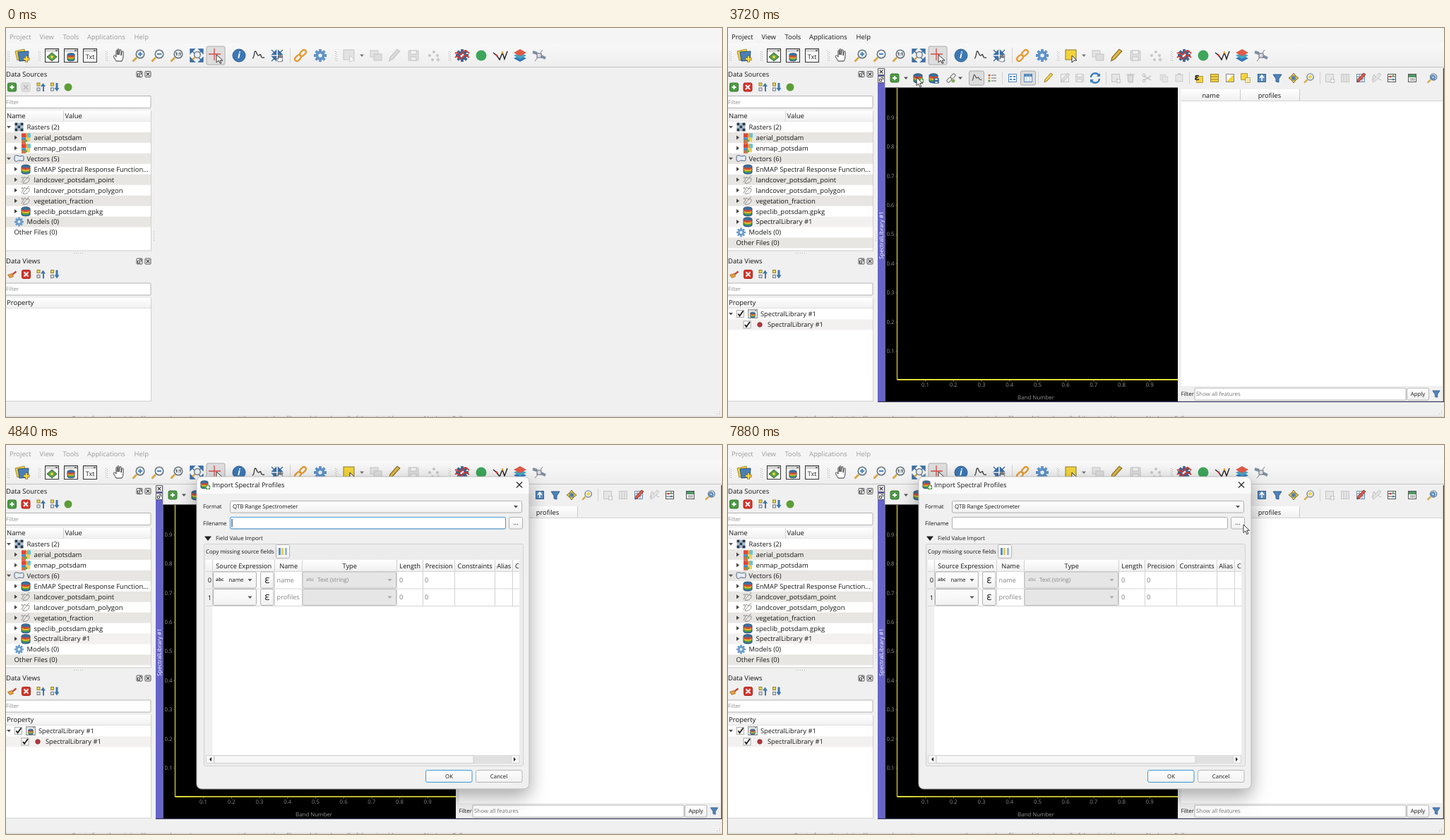
These frames come from a looping animation (1014 px wide and 552 px high, 8 s). An HTML page:

```html
<!DOCTYPE html>
<html lang="en">
<head>
<meta charset="utf-8">
<title>Import spectral profiles</title>
<style>
html,body{margin:0;width:100%;height:100%;overflow:hidden;background:#f0f0f0}
svg{display:block;width:100%;height:100%}
text{font-family:"Open Sans","Noto Sans",sans-serif;white-space:pre;text-rendering:geometricPrecision}
</style>
</head>
<body>
<svg id="stage" viewBox="0 0 1014 552" xmlns="http://www.w3.org/2000/svg"></svg>
<script>
const DARK = '#161616', GREY = '#c6c6c6', BLUE = '#4f86bd', YEL = '#f3d33c';

// Drawing helpers
const R = (x, y, w, h, f = 'none', s = 'none', r = 0) =>
  `<rect x="${x}" y="${y}" width="${w}" height="${h}" fill="${f}" stroke="${s}" rx="${r}"/>`;
const P = (d, f = 'none', s = 'none', w = 1) =>
  `<path d="${d}" fill="${f}" stroke="${s}" stroke-width="${w}"/>`;
const C = (x, y, r, f = 'none', s = 'none', w = 1) =>
  `<circle cx="${x}" cy="${y}" r="${r}" fill="${f}" stroke="${s}" stroke-width="${w}"/>`;
const T = (x, cy, s, size = 9.5, f = DARK, anchor = 'start', more = '') =>
  `<text x="${x}" y="${cy + size * .36}" font-size="${size}" fill="${f}" text-anchor="${anchor}" ${more}>${s}</text>`;
const at = (x, y, body, k = 1) => `<g transform="translate(${x} ${y}) scale(${k})">${body}</g>`;
const turn = body => [0, 90, 180, 270].map(a => `<g transform="rotate(${a})">${body}</g>`).join('');
const G = (id, body, more = '') => `<g id="${id}" ${more}>${body}</g>`;
const down = (x, y, f = '#555', k = 1) => at(x, y, P('M-3-1.5H3L0 2z', f), k);
const side = (x, y) => P(`M${x - 2} ${y - 3}l4 3-4 3z`, '#444');
const dots = (x, y, dx, dy, n) =>
  Array.from({length: n}, (_, i) => R(x + dx * i, y + dy * i, 1, 1, '#b0b0b0')).join('');
const gear = (f, r = 7) => {
  let d = '';
  for (let a = 0; a < 8; a++) d += `M0 0L${r * Math.cos(a * Math.PI / 4)} ${r * Math.sin(a * Math.PI / 4)}`;
  return P(d, 'none', f, r * .42) + C(0, 0, r * .7, f) + C(0, 0, r * .3, '#eef2f6');
};

// Icons, each centred on 0,0
const band = (y, f) => P(`M-6 ${y}V${y + 2.7}A6 2.2 0 0 0 6 ${y + 2.7}V${y}z`, f);
const db = band(2, '#2f6fb3') + band(.3, '#4f9f3a') + band(-1.9, '#e9b32a') + band(-4, '#cf4a35') +
  '<ellipse cx="0" cy="-4" rx="6" ry="2.2" fill="#3a6f9f"/>' + P('M-6-4V4.7A6 2.2 0 0 0 6 4.7V-4A6 2.2 0 0 0-6-4', 'none', '#2a4a68', .9);
const plus = P('M0-3V3M-3 0H3', 'none', '#fff', 2);
const badge = (x, y, f = '#57a046') => at(x, y, R(-4, -4, 8, 8, f, 'none', 2) + plus, .8);
const frame = body => R(-9.5, -9.5, 19, 19, '#fafafa', '#333') + R(-9, -9, 18, 4, '#d6d6d6') +
  P('M5-7H8', 'none', '#555', 1.5) + body;
const lens = body => P('M-3 3L-8.5 8.5', 'none', '#d7a63f', 2.8) + C(2, -2, 5.8, '#e8eef4', '#66717c', 1.5) + at(1, 0, body);
const corners = (f, r = 8) => turn(P(`M${r} ${r}H${r - 6}L${r} ${r - 6}zM3 3L${r - 2} ${r - 2}`, f, f, 1.4));
const inward = f => turn(P('M1.5 1.5H7L1.5 7zM4 4L8 8', f, f, 1.4));
const pencil = (f, s) => P('M-5 6L-4 2 4-7 7-5-1 4z', f, s);
const box = (f, s, body = '') => R(-5.5, -5.5, 11, 11, f, s) + body;
const disk = (f, s) => R(-7, -7, 14, 14, f, s, 1) + R(-4, -7, 8, 5, '#f4f4f4', s) + R(-4, 2, 8, 5, '#eee', s);
const wave = f => P('M-8 4C-5 4-6-6-4-6S-2-1 0 0 3-4 4 0 6 3 9 3', 'none', f, 1.3);
const link = (f, w = 2.4) => `<g transform="rotate(-45)">${
  ['-10', '0'].map(x => `<rect x="${x}" y="-3" width="10" height="6" rx="3" fill="none" stroke="${f}" stroke-width="${w}"/>`).join('')}</g>`;
const grid = f => box('#fff', f, P('M-5-2H5M-5 1H5M-2-5V5M2-5V5', 'none', f));
const lines = f => P('M-1-4H6M-1 0H6M-1 4H6', 'none', f, 1.6) +
  C(-4, -4, 1.6, '#c55') + C(-4, 0, 1.6, '#e0a22f') + C(-4, 4, 1.6, '#5a9b4a');
const hand = P('M-4 8C-6 4-9 1-7 0S-4 3-4 2V-6C-4-8-2-8-2-6V-1-8C-2-10 0-10 0-8V-1L1-7C1-9 3-9 3-7V0L4-5C5-7 7-6 6-4 6 2 6 5 4 8z', '#fff', '#333');
const hands = inward('#3a6ea5') + at(4, 4, hand, .6);
const funnel = P('M-6-5H6L2 1V6L-2 5V1z', '#4e83ba', '#315e8c');
const arrow = P('M0 0V11.5L2.7 9 4.8 13.6 6.8 12.7 4.7 8.2H8.4z', '#fff', '#222', .9);
const tile = [['#d9473c', -6, -6], ['#ef9c3d', 0, -6], ['#f0cf58', 0, 0], ['#3f8fd0', -6, 0], ['#67c3cf', 3, -6],
  ['#dc6d48', -6, 3]].map(a => R(a[1], a[2], a[1] > 2 ? 4 : 6, 6, a[0])).join('') + R(-2, 3, 4, 3, '#58a957');
const checker = [0, 1, 2, 3, 4, 5, 6, 7, 8].map(i =>
  R(-6 + i % 3 * 4, -6 + (i / 3 | 0) * 4, 4, 4, i % 2 ? '#a9bccd' : '#27384b')).join('');
const shape = P('M-6-4C-3-6 0-2 4-4 7-5 7 0 6 3 3 4 0 1-3 4-7 5-7-1-6-4z', '#e6ecf4', '#4a5f7c');
const vect = P('M-6 4L-2-4 1-2 5-6M-4 5C1 6 5 3 5-1S-1-1-4 5z', 'none', '#8b8b8b') + C(-5, -3, 1.3, '#aaa');
const treeIcon = up => R(-5, -6, 4, 4, YEL, '#94813a') + R(-5, 1, 4, 4, '#dfe6ef', '#778') +
  P(up ? 'M3 6V-1H0L3.5-6 7-1H5V6z' : 'M2-6V1H0L3.5 6 7 1H5V-6z', '#3f78ad');
const cross = on => R(-6, -6, 12, 12, on ? '#d5362c' : '#e2e2e2', on ? '#a8251d' : '#cacaca', 2) +
  P('M-3-3L3 3M3-3L-3 3', 'none', on ? '#fff' : '#bdbdbd', 1.8);
const addBtn = R(-6, -6, 12, 12, '#4d9a45', '#397a33', 2) + plus;
const tiny = (x, y, s = 8) => R(x - s / 2, y - s / 2, s, s, '#f4f4f4', '#555', 1);
const closeBtn = (x, y, s = 8) => tiny(x, y, s) + at(x, y, P('M-2.3-2.3L2.3 2.3M2.3-2.3L-2.3 2.3', 'none', '#333', 1.2));
const floatBtn = (x, y, s = 8) => tiny(x, y, s) + R(x - 2.5, y - .5, 3, 3, '#fff', '#444') + P(`M${x - .5} ${y - 2.5}h3v3`, 'none', '#444');

function editTools(on) {
  const line = on ? '#8a7a32' : GREY, soft = on ? YEL : '#e2e2e2';
  return at(486, 39, R(-8, -8, 15, 14, soft, line) + at(1, 0, P('M0 0V10L3 7H7z', '#fff', on ? '#333' : GREY))) +
    at(549, 39, pencil(on ? '#e3bb3e' : '#dcdcdc', on ? '#8a7030' : GREY), 1.25) + at(28, 84, cross(on));
}

function toolbar() {
  let s = R(0, 0, 1014, 22, '#f5f5f5') + R(0, 22, 1014, 33, 'url(#bar)') + R(0, 55, 1014, 1, '#c4c4c4');
  for (const x of [2, 46, 141, 466, 627]) s += dots(x, 33, 0, 3, 5) + dots(x + 2, 34, 0, 3, 5);
  const items = [
    [23, P('M-10-6L3-9 5 4-7 7z', YEL, '#a78a2b') + P('M-6-5L9-6 8 7-4 8z', '#4a7fb5', '#2d5074') +
      at(6, 5, P('M0-4.5V4.5M-4.5 0H4.5', 'none', '#765c1c', 4) + P('M0-4V4M-4 0H4', 'none', '#f7d64a', 2.4))],
    [65, frame(P('M0-4L7 2 0 8-7 2z', '#5ba14b', '#33622b') + C(0, 2, 2, YEL))],
    [92, frame(at(0, 2, db, .85))],
    [119, frame(T(0, 2, 'Txt', 9, '#222', 'middle'))],
    [160, hand], [188, lens(P('M1-5V1M-2-2H4', 'none', BLUE, 2))], [215, lens(P('M-2-2H4', 'none', BLUE, 2))],
    [242, lens(T(1, -2, '1:1', 6, '#222', 'middle', 'font-weight="bold"'))],
    [270, corners('#3a6ea5', 9) + P('M-2 2L-6 6', 'none', '#d7a63f', 2.4) + C(1, -1, 4.3, '#e8eef4', '#66717c', 1.3)],
    [297, R(-13, -13, 26, 26, '#dedede', '#adadad', 2) + P('M-2-10V7M-10-2H7', 'none', '#d64b45', 1.3) + at(1, -1, P('M0 0V11L3 8 5 12H7L5 8H9z', '#fff', '#333'))],
    [330, C(0, 0, 9, '#3c78b4', '#2b5c8e') + T(0, -.4, 'i', 13, '#fff', 'middle', 'font-weight="bold" font-style="italic"')],
    [357, wave('#333')], [384, hands], [417, link('#e49a31')], [445, gear('#5e93c8', 9)],
    [524, R(-8, -7, 11, 9, '#e4e4e4', GREY) + R(-3, -2, 11, 9, '#ddd', GREY)], [577, disk('#dedede', GREY)],
    [606, C(-6, 0, 2, GREY) + C(0, -5, 2, GREY) + C(5, 0, 2, GREY) + C(-2, 6, 2, GREY) + at(6, 6, P('M0-3V3M-3 0H3', 'none', GREY, 1.5))],
    [646, gear('#41648f', 9) + P('M-10-3C-6-7-4 3 0-3S5-8 10-3M-10 3C-6-2-4 8 0 3S5-1 10 3', 'none', '#d8382f', 1.9)], [673, C(0, 0, 7.5, '#3da65a')],
    [700, P('M-10-4L-5 0-1 6 3-4 6 5 10-6', 'none', '#222', 1.4) + C(-5, 0, 1.4, '#d33') + C(3, -4, 1.4, '#e8a22c')],
    [728, P('M0 0L9 4 0 9-9 4z', '#3377b8') + P('M0-4L9 0 0 5-9 0z', '#44a6c6') + P('M0-9L9-4 0 1-9-4z', '#e05a46')],
    [755, P('M-9-5L-3-3M3 1L9 4', 'none', '#7e8fa2', 4) + R(-3, -3, 6, 6, '#d9dde2', '#667') + P('M-2 3L-6 8M2-4L5-8', 'none', '#778')]
  ];
  for (const [x, body] of items) s += at(x, 39, body);
  return s + down(504, 39, '#777') + R(402, 28, 1, 22, '#d3d3d3');
}

function panel(title, y, icons, headH) {
  return T(0, y, title) + floatBtn(189, y) + closeBtn(201, y) + icons.map(i => at(i[0], y + 18.5, i[1])).join('') +
    R(-1, y + 31, 206, 17, '#fff', '#b2b2b2', 1) + T(0, y + 39.5, 'Filter', 7.8, '#8c8c8c') +
    R(0, y + 52, 205, 15, 'url(#head)') + R(0, y + 66.5, 205, 1, '#cfcfcf') + R(0, y + 67, 205, headH, '#fff') +
    R(205, y + 52, 1, headH + 15, '#d0d0d0') + R(0, y + 67 + headH, 206, 1, '#d0d0d0');
}

function sources(extra) {
  const rows = [
    [0, checker, 'Rasters (2)'], [1, tile, 'aerial_potsdam'], [1, tile, 'enmap_potsdam'],
    [0, shape, `Vectors (${extra ? 6 : 5})`], [1, db, 'EnMAP Spectral Response Function...'],
    [1, vect, 'landcover_potsdam_point'], [1, vect, 'landcover_potsdam_polygon'],
    [1, vect, 'vegetation_fraction'], [1, db, 'speclib_potsdam.gpkg']];
  if (extra) rows.push([1, db, 'SpectralLibrary #1', '#f2f1ef']);
  rows.push([2, gear('#6a9ccb', 6.5), 'Models (0)'], [3, '', 'Other Files (0)']);
  return rows.map(([kind, icon, label, fill = '#e8e6e2'], i) => {
    const y = 140.5 + i * 14.95;
    return (i % 2 ? R(0, y - 7.5, 205, 15, fill) : '') +
      (kind == 0 ? down(4, y) : kind == 1 ? side(14, y) : '') +
      at(kind == 1 ? 28 : 18.5, y, icon) + T([29.5, 39.5, 29.5, 11.5][kind], y, label, 9.45);
  }).join('');
}

const tick = P('M-3 0L-1 3 4-4', 'none', '#111', 1.7);
const check = (x, y) => R(x - 5, y - 5, 10, 10, '#fff', '#aaa');

function dock(wide) {
  const x0 = wide ? 254 : 222.5, dx = wide ? 0 : -31, end = wide ? 652.5 : 637,
    ax = wide ? 283.5 : 239.5, step = wide ? 36.8 : 39.72, left = wide ? 657 : 641.5;
  let s = R(212, 57, x0 - 212, 474, '#6664c9') + R(x0, 56, 1014 - x0, 474, '#f0f0f0') +
    R(x0, 84.5, end - x0, 446, '#000') + R(left, 84, 1012 - left, 446, '#f0f0f0') +
    P('M1013.4 57V530.4H212', 'none', '#3b3b5e', 1.2);
  s += wide ? tiny(223, 68, 20) + closeBtn(223, 68) + tiny(223, 90, 20) + floatBtn(223, 90) :
    closeBtn(217, 62, 9) + floatBtn(217, 73, 9);
  s += `<g transform="translate(217.5 294) rotate(-90)">${T(0, 0, 'SpectralLibrary #1', 8, '#fff', 'middle')}</g>`;
  s += P(`M${ax} 85V499`, 'none', '#c4c24c', 1.4) + P(`M${ax} 499H${end}`, 'none', '#dedc36', 1.8);
  for (let i = 1; i < 10; i++) {
    const v = '0.' + i, y = 499.5 - i * 41.4, x = ax + i * step;
    s += T(ax - 4, y, v, 7.8, '#969696', 'end') + T(x + .3, 506.5, v, 7.8, '#969696', 'middle') +
      R(ax - 2, y, 2, 1, '#777') + R(x, 500, 1, 2, '#777');
  }
  s += T(wide ? 466 : 436, 524.5, 'Band Number', 7.9, '#969696', 'middle');
  // Attribute table
  const mid = wide ? 740 : 725, stop = mid + 84;
  s += R(left + .5, 103, 1011 - left, 405, '#fff') + R(left, 87, stop - left, 16, 'url(#head)') + R(left, 103, 1012 - left, 1, '#d4d4d4') +
    R(mid, 87, 1, 16, '#ccc') + R(stop, 87, 1, 16, '#ccc') + T((left + mid) / 2 + .5, 96, 'name', 9.3, DARK, 'middle') +
    T((mid + stop) / 2, 96, 'profiles', 9.3, DARK, 'middle') + T(left, 519.5, 'Filter', 7.9) +
    R(left + 19.5, 511, 940.5 - left, 17, '#fff', '#b5b5b5', 1) + T(left + 21.5, 519.5, 'Show all features', 7.9, '#777') +
    R(961.5, 511, 31, 17, 'url(#btn)', '#b5b5b5', 2) + T(977, 519.5, 'Apply', 7.9, DARK, 'middle') + at(1003, 519, funnel, .85);
  // Library toolbar
  const on = '#dcdcdc', sel = box(YEL, '#9b8536'), off = box('#e6e6e6', GREY);
  const items = [
    [267, addBtn], [300, db + badge(5, 4)], [322, db + at(4, 4, disk('#3e72a5', '#2b5074'), .5)], [347, at(0, 0, link('#777', 1.4), .75) + C(3, 4, 2.5, '#8a6')],
    [383, R(-10.5, -10, 21, 20, on, '#aaa', 2) + at(0, 0, wave('#444'), .8)], [405, lines('#999')],
    [434, box('#fff', BLUE, P('M-4-2H-1M1-2H4M-4 2H-1M1 2H4', 'none', BLUE, 2))],
    [456, R(-10.5, -10, 21, 20, on, '#aaa', 2) + box('#fff', BLUE, R(-5, -5, 10, 3, BLUE) + P('M-2-5V5M2-5V5', 'none', '#9dbbd8'))],
    [484, pencil('#f0cf44', '#94813a')], [508, box('#eee', GREY) + pencil('#ddd', GREY)], [529, at(0, 0, disk('#dedede', GREY), .8)],
    [551, P('M-6-1A6 6 0 0 1 5-4M6 1A6 6 0 0 1-5 4', 'none', '#3e7fc0', 2.4) + P('M2-2H7V-7zM-2 2H-7V7z', '#3e7fc0')],
    [580, off + badge(4, 4, GREY)], [601, P('M-4-4H4L3 6H-3zM-6-5H6M-1-6H1', '#ddd', '#bbb')],
    [625, P('M-5-3L5 3M-5 3L5-3', 'none', '#bbb', 1.2) + C(-5, 4, 2, 'none', '#bbb') + C(-5, -4, 2, 'none', '#bbb')],
    [648, at(-1, -1, off, .7) + at(2, 2, off, .7)], [670, at(0, 0, off, .9) + R(-2, -7, 4, 3, '#ccc')],
    [697, at(2, 2, sel, .8) + T(-2, -2, 'ε', 13, '#222', 'middle', 'font-weight="bold"')], [720, sel + P('M-5-2H5M-5 2H5', 'none', '#9b8536')],
    [742, box('#fff', '#888') + P('M-5 5L5-5V5z', YEL)], [764, at(-2, -2, sel, .8) + at(3, 3, box('#f5e9a9', '#9b8536'), .6)],
    [787, box('#5b8dbf', '#345f8b') + P('M0 4V-3M-3 0L0-4 3 0', 'none', '#fff', 1.6)], [809, funnel],
    [832, turn(P('M0-7L3-3H-3z', YEL, '#777037')) + C(0, 0, 2.5, '#4c79a8')],
    [854, at(0, 0, lens(C(1, -2, 3, YEL)), .8)], [883, off + badge(4, 4, GREY)], [905, off + P('M-2-5V5M2-5V5', 'none', GREY)],
    [927, grid('#6b8cae') + pencil('#d66049', '#933')], [949, at(0, 0, wave('#bbb'), .8) + pencil('#e4e4e4', GREY)],
    [971, box('#fff', '#555', P('M-5-2H5M-5 2H5', 'none', '#555') + C(-2, -2, 1.6, '#c44') + C(2, 2, 1.6, '#48a') + C(2, -3, 1.4, '#5a5'))]
  ];
  if (!wide) items.push([1000, box('#fff', '#555', R(-5, -5, 10, 4, '#4b9a63') + P('M-3 1H4M-3 3H4', 'none', '#777'))],
    [1028.5, at(0, 0, lens(''), .8) + at(1, -1, gear(BLUE, 4))]);
  for (const [x, body] of items) s += at(x + dx, 71, body);
  for (const x of [419, 470, 566, 684, 869]) s += R(x + dx, 62, 1, 18, '#d2d2d2');
  return s + down(283 + dx, 71) + down(360 + dx, 71) + (wide ? T(1008, 70, '»', 13, '#333', 'middle') : '');
}

const FORMAT = 'QTB Range Spectrometer';

function dialog() {
  let s = `<g filter="url(#shade)">${R(270, 45, 471, 443, '#f0f0f0', '#b3b3b3', 7)}</g>` +
    P('M270.5 69V52Q270.5 45.5 277 45.5H734Q740.5 45.5 740.5 52V69z', '#fafafa') +
    at(281, 56, db, .85) + badge(286, 60) + T(292, 57, 'Import Spectral Profiles', 9.4) +
    P('M723 52.5L731 60.5M731 52.5L723 60.5', 'none', '#222', 1.1) +
    T(279, 87.5, 'Format', 7.9) + R(317.5, 79.5, 413, 16.5, 'url(#btn)', '#b0b0b0', 2) + T(321, 87.5, FORMAT, 7.9) + down(722, 87.5) +
    T(279, 111, 'Filename', 7.9) + R(317.5, 102.5, 390, 16.5, '#fff', '#b0b0b0', 2) +
    R(712.5, 102.5, 19, 16.5, 'url(#btn)', '#b0b0b0', 2) + T(722, 110, '...', 9, DARK, 'middle') +
    P('M281 129.5H291L286 136z', '#222') + T(297, 132, 'Field Value Import', 7.9) +
    R(280.5, 140.5, 452, 315, '#ececec', '#d2d2d2', 2) + T(283, 151.5, 'Copy missing source fields', 7.9) +
    R(382.5, 141.5, 19, 19, 'url(#btn)', '#b5b5b5', 2) +
    at(392, 151, R(-6, -5, 3, 10, '#5b8dbf') + R(-2, -5, 3, 10, '#e3cf59') + R(3, -5, 3, 10, '#9ab6cf')) +
    R(283, 163, 444, 289, '#fff') + R(283, 163, 444, 16, 'url(#head)') + R(283, 179, 9, 49, '#f0f0f0') + R(283, 228, 9, 212, '#f0f0f0');
  const cols = [292, 380, 419, 553, 590, 635, 692, 717];
  const names = ['Source Expression', 'Name', 'Type', 'Length', 'Precision', 'Constraints', 'Alias'];
  cols.forEach((x, i) => {
    s += R(x, 163, 1, 65, '#d2d2d2');
    if (names[i]) s += T((x + cols[i + 1]) / 2 + .7, 172, names[i], 9.25, DARK, 'middle');
  });
  s += T(721, 172, 'C', 9.25, DARK, 'start', 'clip-path="url(#edge)"');
  [192, 216.5].forEach((y, i) => {
    s += R(283, y - 13, 444, 1, '#d6d6d6') + T(288.5, y, i, 9.25, DARK, 'middle') +
      R(293.5, y - 12, 61, 23, 'url(#btn)', '#b0b0b0', 2) + down(345.5, y - .5) +
      R(360.5, y - 12, 18.5, 23, 'url(#btn)', '#b0b0b0', 2) + T(369.7, y - 1.5, 'ε', 15, '#222', 'middle') +
      T(383.5, y - .5, i ? 'profiles' : 'name', 9.2, '#858585') +
      R(420, y - 12, 132.5, 23, '#e6e6e6', '#bdbdbd', 2) + down(543.5, y - .5, '#aaa') +
      T(557, y - .5, 0, 9.2, '#777') + T(593, y - .5, 0, 9.2, '#777');
    if (!i) s += T(297, y - 1.5, 'abc', 6.5, '#444', 'start', 'font-weight="bold"') + T(315.5, y - .5, 'name', 7.9) +
      T(425, y - 1.5, 'abc', 6.5, '#aaa', 'start', 'font-weight="bold"') + T(441, y - .5, 'Text (string)', 8.2, '#858585');
  });
  s += R(283, 228, 444, 1, '#d6d6d6') + R(283, 440, 444, 12, '#e0e0e0') + R(283.5, 440.5, 11, 11, '#f7f7f7', '#d5d5d5') +
    R(715.5, 440.5, 11, 11, '#f7f7f7', '#d5d5d5') + R(295, 440.5, 367, 11, '#f7f7f7', '#cecece') +
    P('M291 443v6l-3-3zM719 443v6l3-3z', '#222');
  return s + R(594.5, 461.5, 65.5, 17, 'url(#btn)', '#3d97d8', 2) + T(627.5, 470, 'OK', 7.9, DARK, 'middle') +
    R(665.5, 461.5, 65.5, 17, 'url(#btn)', '#b5b5b5', 2) + T(698, 470, 'Cancel', 7.9, DARK, 'middle') +
    G('focus', R(317.5, 102.5, 390, 16.5, 'none', '#4a9edb', 2)) + G('caret', R(319.5, 105, 1, 11.5, '#111'));
}

function popup() {
  const names = ['Geopackage', 'GeoJSON', 'Envi Spectral Library', FORMAT, 'Orvaline Wavescopes', 'Raster Layer'];
  return R(321, 33, 413, 100, 'rgba(0,0,0,.13)', 'none', 2) + R(317.5, 29, 413.5, 101, '#f0f0f0', '#8c8c8c') +
    R(318, 79.7, 412.5, 16.3, '#0078d7') +
    names.map((n, i) => T(323.5, 38.5 + i * 16.55, n, 7.9, i == 3 ? '#fff' : DARK)).join('');
}

const grad = (id, a, b) => `<linearGradient id="${id}" x2="0" y2="1"><stop stop-color="${a}"/><stop offset="1" stop-color="${b}"/></linearGradient>`;
const menu = [['Project', 5], ['View', 47.5], ['Tools', 80.5], ['Applications', 115], ['Help', 181.5]];
const trees = [[49, treeIcon(true)], [68.5, treeIcon(false)]];
const brush = P('M-6 1L0-1 2 3-3 5z', '#e8a33a', '#a8752b') + P('M1 0L6-4', 'none', '#c8473b', 2.5);

document.getElementById('stage').innerHTML = `<defs>${grad('bar', '#f8f8f8', '#eeeeee')}${grad('head', '#ffffff', '#f0f0f0')}${grad('btn', '#fefefe', '#f1f1f1')}
<filter id="shade" x="-12%" y="-12%" width="124%" height="128%"><feDropShadow dx="0" dy="10" stdDeviation="13" flood-opacity=".35"/></filter>
<clipPath id="edge"><path d="M717 160H727V180H717z"/></clipPath></defs>` +
  R(0, 0, 1014, 552, '#f0f0f0') + toolbar() +
  G('menu', menu.map(m => T(m[1], 12.5, m[0], 9.45, 'currentColor')).join('')) +
  G('toolsOff', editTools(false)) +
  panel('Data Sources', 65.5, [[8.5, addBtn], ...trees, [88, C(0, 0, 5.5, '#5c9d35')]], 183) + T(1, 125, 'Name') + T(83.5, 125, 'Value') + R(81, 118, 1, 14, '#d0d0d0') +
  panel('Data Views', 331, [[8.5, brush], [28.5, cross(true)], ...trees], 131) + T(1, 390, 'Property') +
  dots(96, 319, 3, 0, 5) + dots(209, 289, 0, 3, 5) + R(0, 550.5, 1014, 1.5, '#dcdcdc') +
  T(93, 554, 'Create from the existing library and open its source support the spectral profiles, and then show all of them in table', 8.6, '#777') +
  T(592, 554, 'No. Layer Folk', 8.6, '#777') + dots(1010, 544, 0, 3, 2) + dots(1007, 547, 0, 3, 1) +
  G('treeA', sources(false)) +
  G('treeB', sources(true) + editTools(true) + down(4, 405.5) + check(17.5, 405.5) + at(35, 405.5, frame(at(0, 2, db, .9)), .65) +
    T(46, 405.8, 'SpectralLibrary #1', 9.3) + R(0, 413.5, 205, 15, '#f2f1ef') + check(27, 421) + at(27, 421, tick) +
    C(45, 421, 3.2, '#b5383c', '#8b3034') + T(56, 421, 'SpectralLibrary #1', 9.3)) +
  G('checked', at(17.5, 405.5, tick)) + G('wide', dock(true)) + G('narrow', dock(false)) +
  G('hover', R(79.5, 26.5, 25, 25, 'none', '#8c8c8c', 2)) +
  G('pressed', R(258.5, 61.5, 20, 19, 'none', '#aaa', 2)) +
  G('dialog', dialog()) + G('popup', popup()) +
  G('click', C(0, 0, 10.3, '#8cc83c'), 'opacity=".82"') + G('cursor', arrow);

const el = {};
for (const id of ['menu', 'toolsOff', 'treeA', 'treeB', 'checked', 'wide', 'narrow', 'hover', 'pressed', 'dialog', 'focus', 'caret', 'popup', 'click', 'cursor'])
  el[id] = document.getElementById(id);
const show = (id, on) => el[id].style.display = on ? '' : 'none';

// Pointer path: time, x, y
const path = [[320, 878, 515], [520, 375, 132], [720, 375, 132], [1520, 98, 42], [1760, 93, 38], [2960, 93, 38],
  [3520, 293, 72], [3760, 265, 70], [3840, 264, 69], [4000, 264, 70], [4600, 264, 70], [4880, 340, 73],
  [5320, 696, 85], [5760, 427, 89], [7240, 427, 89], [7880, 730, 113]];

function pointer(t) {
  let i = 0;
  while (i < path.length - 2 && t >= path[i + 1][0]) i++;
  const [a, b] = [path[i], path[i + 1]];
  const u = Math.max(0, Math.min(1, (t - a[0]) / (b[0] - a[0]))), e = u * u * (3 - 2 * u);
  return [a[1] + (b[1] - a[1]) * e, a[2] + (b[2] - a[2]) * e];
}

function draw(t) {
  const within = (a, b) => t >= a && t < b, lib = t >= 2360;
  el.menu.setAttribute('color', within(2160, 4600) ? DARK : '#9b9b9b');
  show('toolsOff', !lib);
  show('treeA', !lib);
  show('treeB', lib);
  show('checked', t >= 2960);
  show('wide', within(2440, 2640));
  show('narrow', t >= 2640);
  show('hover', within(1480, 3040));
  show('pressed', within(4240, 4520));
  show('dialog', t >= 4520);
  const u = Math.max(0, Math.min(1, (t - 4520) / 240)), k = 1 - .2 * (1 - u) ** 3;
  el.dialog.setAttribute('opacity', Math.min(1, .1 + u * .95));
  el.dialog.setAttribute('transform', `translate(${453 * (1 - k)} ${240 * (1 - k)}) scale(${k})`);
  show('focus', t < 6040);
  show('caret', t < 5080 || within(5600, 6040));
  show('popup', within(6040, 6920));
  el.popup.setAttribute('opacity', t < 6080 ? .5 : 1);
  const [x, y] = pointer(t), pos = `translate(${x} ${y})`;
  el.cursor.setAttribute('transform', pos);
  el.click.setAttribute('transform', pos);
  show('cursor', t >= 320 && !within(4600, 4880));
  show('click', within(2160, 2360) || within(4240, 4520) || within(6040, 6280) || within(6640, 6920));
}

function tickFrame(now) {
  draw(Math.floor(now % 8000 / 40) * 40);
  requestAnimationFrame(tickFrame);
}
draw(0);
requestAnimationFrame(tickFrame);
</script>
</body>
</html>
```
